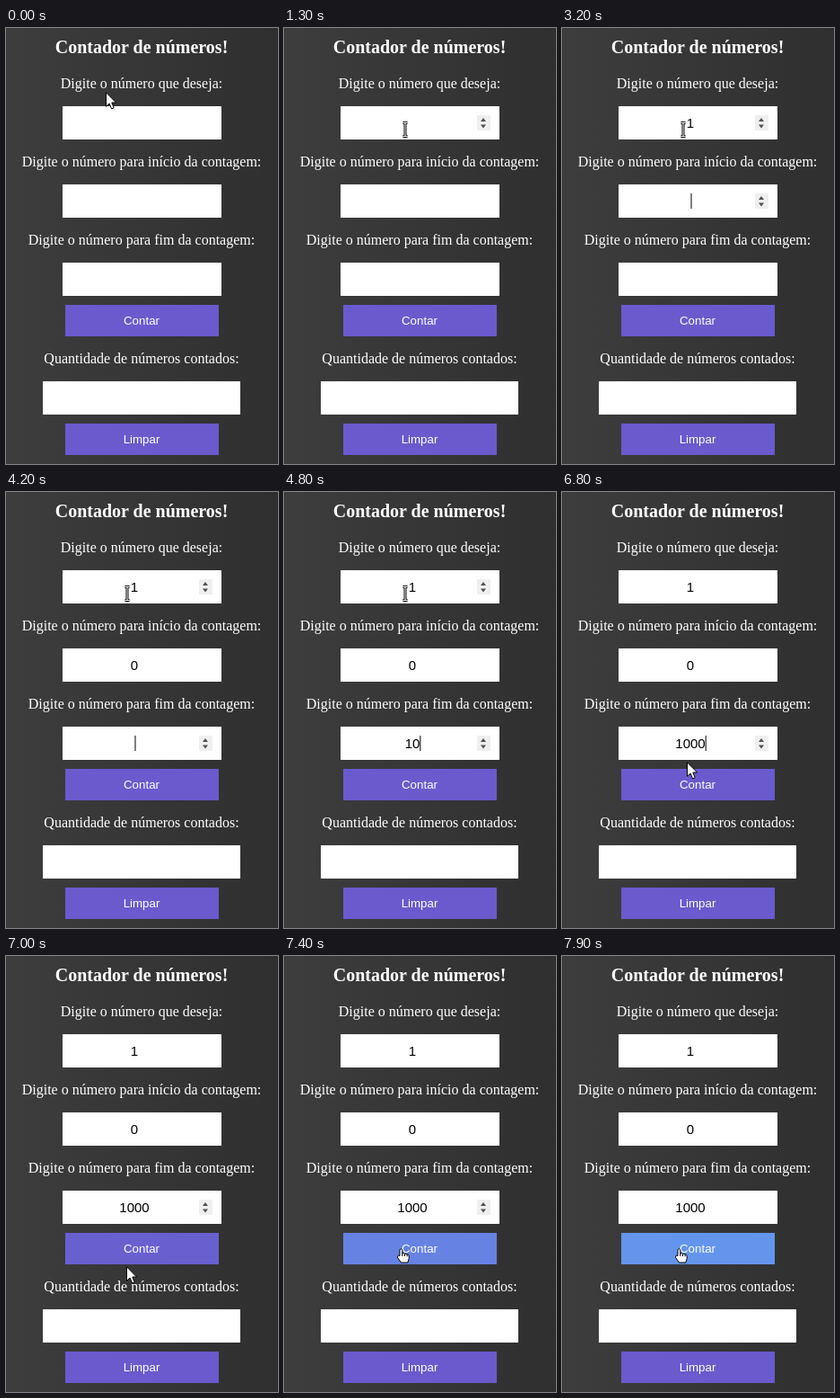
An HTML page for the animation above (8000 ms loop, 303 px wide and 485 px high).

```html
<!DOCTYPE html>
<html lang="pt">
<head>
<meta charset="utf-8">
<style>
  html, body { margin: 0; width: 100%; height: 100%; overflow: hidden; background: #363636; }
  svg { display: block; width: 100%; height: 100%; }
  text { text-anchor: middle; }
  .label { font: 16px "Liberation Serif", serif; fill: #fff; }
  .title { font: bold 20px "Liberation Serif", serif; fill: #fff; }
  .value { font: 15px "Liberation Sans", sans-serif; fill: #000; }
  .button { font: 13.333px "Liberation Sans", sans-serif; fill: #fff; }
  .cursor path { fill: #fff; stroke: #000; stroke-linejoin: round; }
</style>
</head>
<body>
<svg id="stage" viewBox="0 0 303 485" preserveAspectRatio="none">
  <defs>
    <linearGradient id="shade">
      <stop stop-color="#3d3d3d"/>
      <stop offset="1" stop-color="#2f2f2f"/>
    </linearGradient>
    <g id="spinner">
      <rect x="215" y="10" width="15" height="17" rx="1" fill="#efefef"/>
      <path d="M219 17l3-4 3 4zM219 20.5l3 4 3-4z" fill="#505050"/>
    </g>
  </defs>
  <rect width="303" height="485" fill="url(#shade)"/>
  <text class="title" x="151" y="28">Contador de números!</text>
  <g id="form"></g>
  <rect id="count" x="66" y="308" width="171" height="35"/>
  <text class="button" x="151" y="330">Contar</text>
  <text class="label" x="151" y="373">Quantidade de números contados:</text>
  <rect x="41" y="393" width="220" height="37" fill="#fff"/>
  <rect x="66" y="440" width="171" height="35" fill="#6a5acd"/>
  <text class="button" x="151" y="462">Limpar</text>
  <g class="cursor" id="arrow">
    <path d="M.5 .8V16.3L4.1 13 6.6 18.9 9.2 17.8 6.8 12H11.6Z"/>
  </g>
  <g class="cursor" id="beam">
    <path id="beamShape" d="M-2.5-6.5H-1Q0-6.5 0-5.5 0-6.5 1-6.5H2.5M0-5.5V7.5M-2.5 8.5H-1Q0 8.5 0 7.5 0 8.5 1 8.5H2.5" style="fill:none;stroke-width:3"/>
    <use href="#beamShape" style="display:none"/>
    <path d="M-2.5-6.5H2.5M0-6.5V8.5M-2.5 8.5H2.5" style="fill:none;stroke:#fff;stroke-width:1"/>
  </g>
  <g class="cursor" id="hand">
    <path d="M-2 8.5V1.7Q-.6-.4 .8 1.7V6Q2.3 5 3.5 6.4 5 5.6 6.1 7 7.8 6.6 8.2 8.5V11.5L6.8 16H-.6L-4.4 10.5Q-4.8 8.3-3.3 8.2Z"/>
    <path d="M.8 6V9M3.5 6.4V9M6.1 7V9.3" style="fill:none"/>
  </g>
</svg>
<script>
const LOOP = 8000;
const CENTER = 143, DIGIT = 8.34;

// Every track lists [start time, ...value] and holds each value until the next.
const fields = [
  { y: 87, label: "Digite o número que deseja:",
    text: [[0, ""], [2000, "1"]],
    caret: [[0, 0], [700, 1], [1300, 0], [1900, 1], [3200, 0]],
    spinner: [[0, 0], [100, 1], [6300, 0]] },
  { y: 174, label: "Digite o número para início da contagem:",
    text: [[0, ""], [3800, "0"]],
    caret: [[0, 0], [3200, 1], [3400, 0], [3800, 1], [4200, 0]],
    spinner: [[0, 0], [3200, 1], [4200, 0], [6600, 1], [6700, 0]] },
  { y: 261, label: "Digite o número para fim da contagem:",
    text: [[0, ""], [4600, "1"], [4800, "10"], [5000, "100"], [5100, "1000"]],
    caret: [[0, 0], [4200, 1], [5700, 0], [6300, 1], [6900, 0], [7500, 1], [7900, 0]],
    spinner: [[0, 0], [4200, 1], [7900, 0]] }
];

const pointer = [
  [0, "arrow", 111, 71], [100, "beam", 127, 98], [200, "beam", 136, 112],
  [400, "beam", 135, 112], [6300, "arrow", 142, 168], [6400, "arrow", 142, 169],
  [6600, "beam", 142, 200], [6700, "arrow", 141, 250], [6800, "arrow", 139, 300],
  [6900, "hand", 136, 325], [7000, "arrow", 134, 345], [7100, "arrow", 133, 344],
  [7200, "hand", 132, 335], [7300, "hand", 131, 329], [7400, "hand", 131, 325]
];

const hover = [[0, 0], [7000, .1], [7100, 0], [7300, .3], [7400, .68],
  [7500, .89], [7600, .98], [7700, 1]];

const $ = id => document.getElementById(id);
const show = (el, visible) => el.setAttribute("visibility", visible ? "visible" : "hidden");
const at = (track, t) => track.findLast(step => step[0] <= t).slice(1);

$("form").innerHTML = fields.map(f => `
  <text class="label" x="151" y="${f.y - 20}">${f.label}</text>
  <g transform="translate(0 ${f.y})">
    <rect x="63" width="177" height="37" fill="#fff"/>
    <text class="value" x="${CENTER}" y="24"></text>
    <rect class="caret" y="10" width="1" height="17"/>
    <use href="#spinner"/>
  </g>`).join("");

fields.forEach((f, i) => {
  const group = $("form").querySelectorAll("g")[i];
  f.value = group.querySelector("text");
  f.bar = group.querySelector(".caret");
  f.arrows = group.querySelector("use");
});

function draw(t) {
  for (const f of fields) {
    const [text] = at(f.text, t);
    f.value.textContent = text;
    f.bar.setAttribute("x", CENTER + (text ? text.length * DIGIT / 2 : .5));
    show(f.bar, at(f.caret, t)[0]);
    show(f.arrows, at(f.spinner, t)[0]);
  }
  const [shape, x, y] = at(pointer, t);
  for (const id of ["arrow", "beam", "hand"]) show($(id), id === shape);
  $(shape).setAttribute("transform", `translate(${x} ${y})`);

  const [mix] = at(hover, t);
  const rgb = [[106, 100], [90, 149], [205, 237]].map(([a, b]) => Math.round(a + (b - a) * mix));
  $("count").setAttribute("fill", `rgb(${rgb})`);
}

const start = performance.now();
function frame() {
  draw((performance.now() - start) % LOOP);
  requestAnimationFrame(frame);
}
frame();
</script>
</body>
</html>
```
